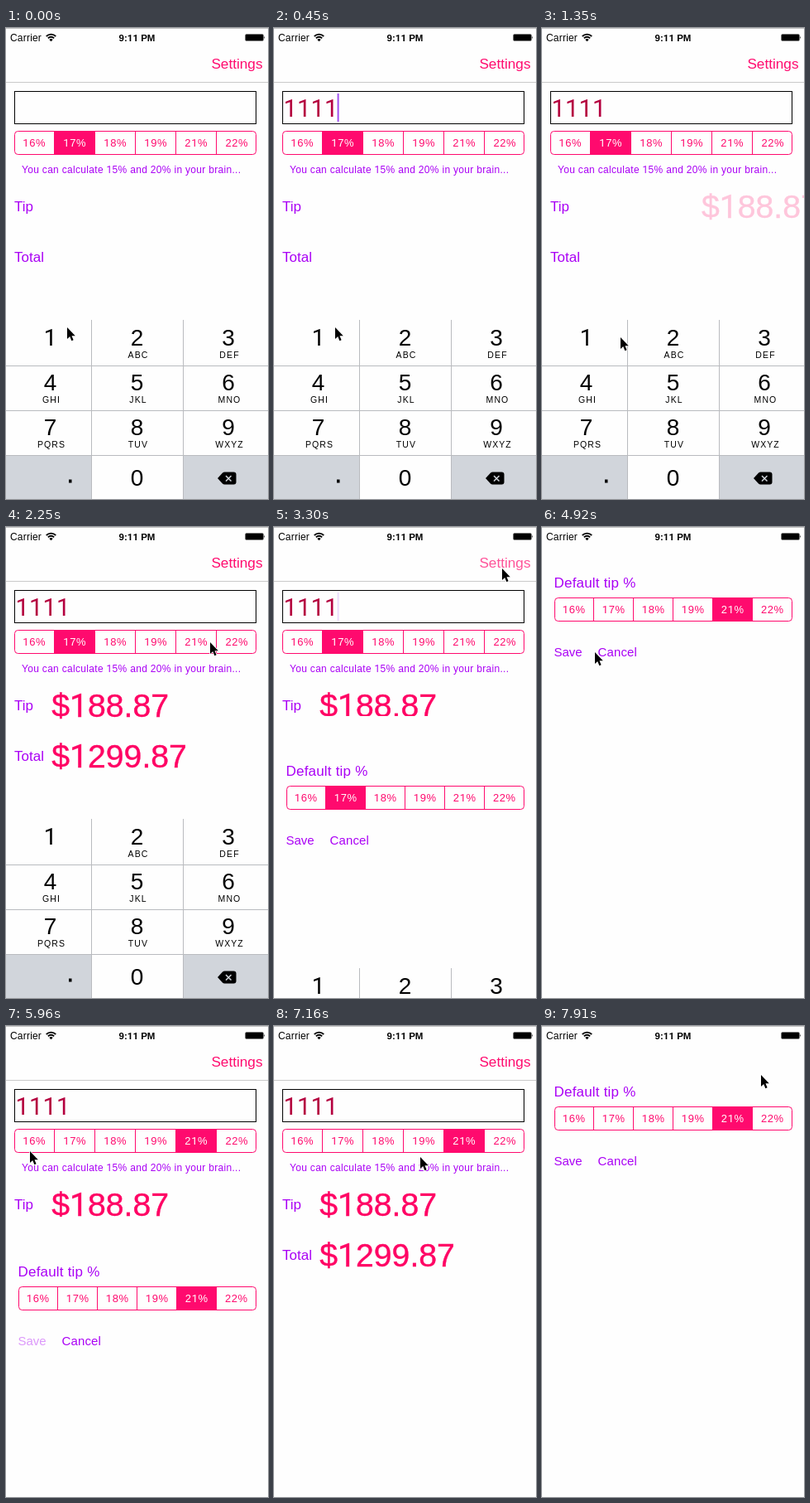
Animation, 317 px wide and 568 px high, one loop 8 s. Source, as an HTML page:

```html
<!DOCTYPE html>
<html lang="en">
<head>
<meta charset="utf-8">
<title>Tip calculator</title>
<style>
  html, body { margin: 0; width: 100%; height: 100%; overflow: hidden; background: #fefefe; }
  svg { display: block; width: 100%; height: 100%; font-family: "Liberation Sans", Arial, sans-serif; }
  text { white-space: pre; }
  .one { font-family: Roboto, sans-serif; }
  .pink { fill: #ff0a6e; }
  .purple { fill: #aa00f5; }
  .value { fill: #ff0364; stroke: #ff0364; stroke-width: .4px; font-size: 39.2px; }
  .seg { font-size: 13px; letter-spacing: .6px; text-anchor: middle; }
  .key { font-size: 28px; text-anchor: middle; }
  .letters { font-size: 10.5px; letter-spacing: 1.1px; text-anchor: middle; }
</style>
</head>
<body>
<svg id="stage" viewBox="0 0 317 568"></svg>
<script>
const BEAT = 149, LOOP = 8000, HEIGHT = 568, KEYBOARD = 216, SPRING = 2.1;
const RATES = [16, 17, 18, 19, 21, 22].map(r => r + '%');

// The plain "1" without a foot comes from a second typeface.
const plainOnes = s => s.replace(/1/g, '<tspan class="one">1</tspan>');
const text = (x, y, s, cls, attrs = '') =>
  `<text x="${x}" y="${y}" class="${cls}" ${attrs}>${plainOnes(s)}</text>`;
const rect = (x, y, w, h, attrs) =>
  `<rect x="${x}" y="${y}" width="${w}" height="${h}" ${attrs}/>`;

function segments(id, x, y, w) {
  const cell = Math.round(w / 6);
  const at = i => x - 1 + i * cell;
  return `<g id="${id}">` +
    RATES.map((_, i) => rect(at(i), y, cell, 28, 'class="pink cell"')).join('') +
    rect(x, y, w, 28, 'rx="4" fill="none" stroke="#ff0a6e"') +
    [1, 2, 3, 4, 5].map(i => `<path d="M${at(i)} ${y}v28" stroke="#ff0a6e"/>`).join('') +
    RATES.map((r, i) => text(at(i + .5) + .3, y + 18.5, r, 'seg pink')).join('') + '</g>';
}

function keyboard() {
  const letters = ['', 'ABC', 'DEF', 'GHI', 'JKL', 'MNO', 'PQRS', 'TUV', 'WXYZ'];
  const columns = [53.5, 158.5, 269];
  const keys = letters.map((s, i) => {
    const x = columns[i % 3], y = 383 + 54 * Math.floor(i / 3);
    return text(x, y, `${i + 1}`, 'key') + text(x + 1.5, y + 15, s, 'letters');
  }).join('');
  return '<g id="keyboard">' +
    rect(0, 352, 317, 216, 'fill="#fefefe"') +
    rect(0, 352, 103, 55, 'fill="#d1d5db" id="pressed"') +
    rect(0, 515, 103, 53, 'fill="#d1d5db"') + rect(215, 515, 102, 53, 'fill="#d1d5db"') +
    '<path d="M103.5 352v216M214.5 352v216M0 407.5h317M0 461.5h317M0 515.5h317" stroke="#b9bbbf"/>' +
    keys + text(158.5, 552, '0', 'key') + rect(76, 544.5, 3.5, 4, '') +
    '<path d="M256 543l6-6.5q1-1 2.5-1h11q3 0 3 3v9q0 3-3 3h-11q-1.5 0-2.5-1z"/>' +
    '<path d="M266 540l6.5 6.5m0-6.5l-6.5 6.5" stroke="#d1d5db" stroke-width="1.5"/></g>';
}

const mainScreen =
  rect(0, 0, 317, 568, 'fill="#fefefe"') +
  '<path d="M0 65.5h317" stroke="#c9c9c9"/>' +
  text(310.5, 49, 'Settings', 'pink', 'id="settings" font-size="17.2" text-anchor="end"') +
  rect(10.5, 76.5, 292, 39, 'fill="none" stroke="#000"') +
  text(11.5, 107, '', '', 'id="amount" font-size="29.4" fill="#b4003f"') +
  rect(0, 79, 2, 34, 'id="caret" fill="#a050f0"') +
  segments('rate', 10.5, 124.5, 292) +
  text(19, 175, 'You can calculate 15% and 20% in your brain...', 'purple', 'font-size="12" letter-spacing=".31"') +
  text(10, 220.5, 'Tip', 'purple', 'font-size="17"') +
  text(10, 281.5, 'Total', 'purple', 'font-size="17"') +
  text(55.2, 229, '$188.87', 'value', 'id="tip"') +
  text(55.2, 290, '$1299.87', 'value', 'id="total"');

const modal = '<g id="modal">' +
  rect(0, 1, 317, 568, 'fill="#fefefe"') +
  text(14.5, 72.5, 'Default tip %', 'purple', 'font-size="17" letter-spacing=".2"') +
  segments('preset', 15.5, 85.5, 287) +
  text(14.5, 155.5, 'Save', 'purple', 'id="save" font-size="15"') +
  text(67.5, 155.5, 'Cancel', 'purple', 'font-size="15" letter-spacing=".15"') + '</g>';

const statusBar =
  rect(0, 0, 317, 1, 'fill="#c2c2c2"') +
  text(5, 16, 'Carrier', '', 'font-size="12" letter-spacing=".2"') +
  '<g fill="none" stroke="#000" stroke-width="1.9"><path d="M48.8 10a8 8 0 0 1 11.4 0M50.9 12.3a5 5 0 0 1 7.2 0"/></g>' +
  '<path d="M52.3 14a3.2 3.2 0 0 1 4.4 0l-2.2 2.3z"/>' +
  text(158.5, 15.5, '9:11 PM', '', 'font-size="11.5" font-weight="700" text-anchor="middle"') +
  rect(289.5, 7.5, 22, 8, 'rx="1.5" fill="#000" stroke="#777" stroke-width=".6"') +
  '<path d="M312.3 9.8q1.6 1.7 0 3.4z"/>';

const pointer = '<path id="pointer" d="M0 0V14l3.2-3 2.2 5.2 2.2-1-2.1-4.9h4.3z" stroke="#fff" stroke-width="1.6" paint-order="stroke"/>';

document.getElementById('stage').innerHTML = mainScreen + modal + keyboard() + statusBar + pointer;

const el = id => document.getElementById(id);
const set = (id, name, value) => el(id).setAttribute(name, value);
const shift = (id, x, y) => set(id, 'transform', `translate(${x} ${y})`);
const clamp = v => Math.min(1, Math.max(0, v));
const within = (n, a, b) => n >= a && n <= b;
const settle = d => d <= 0 ? 0 : 1 - Math.exp(-SPRING * d);

// Pointer stops: beat, x, y
const PATH = [
  [0, 74, 361], [6, 74, 361], [9, 95, 373], [10, 110, 363], [13, 205, 236], [14, 236, 180],
  [15, 247, 139], [17, 286, 80], [20, 276, 48], [22, 276, 50], [23, 276, 52], [27, 234, 97],
  [29, 234, 97], [33, 64, 151], [34, 64, 151], [36, 30, 152], [40, 29, 151], [42, 44, 189],
  [44, 77, 265], [45, 77, 265], [51, 276, 51], [53, 265, 59]
];

function pointerAt(n) {
  const i = Math.max(1, PATH.findIndex(p => p[0] >= n));
  const [a, b] = [PATH[i - 1], PATH[i]];
  const f = (n - a[0]) / (b[0] - a[0]);
  return [1, 2].map(k => Math.round(a[k] + (b[k] - a[k]) * f));
}

function select(id, chosen) {
  el(id).querySelectorAll('.cell').forEach((c, i) => c.style.opacity = i === chosen ? 1 : 0);
  el(id).querySelectorAll('text').forEach((t, i) => t.style.fill = i === chosen ? '#fff' : '');
}

function slideIn(id, d) {
  const t = clamp(d / 3.3), p = t * t * (3 - 2 * t);
  shift(id, 176.5 * (1 - p), 0);
  set(id, 'opacity', p);
}

function modalTop(n) {
  const travel = n < 39 ? 1 - settle(n - 21.563)
    : n < 50 ? settle(n - 39.754)
    : 1 - settle(n - 51.163);
  return Math.round(HEIGHT * travel);
}

function draw(n) {
  const digits = [0, 1, 3][n] ?? 4;
  el('amount').innerHTML = plainOnes('1'.repeat(digits));
  set('caret', 'x', 11 + 16.4 * digits);
  set('caret', 'opacity', n === 22 ? .2 : within(n, 1, 6) || within(n, 10, 13) || within(n, 17, 21) ? 1 : 0);
  set('pressed', 'opacity', within(n, 1, 2) ? 1 : 0);

  slideIn('tip', n - 8);
  slideIn('total', n - 9.6);

  select('rate', n < 36 ? 1 : 4);
  select('preset', n < 29 ? 1 : 4);
  set('settings', 'opacity', { 21: .3, 22: .7, 51: .3, 52: .7 }[n] ?? 1);
  set('save', 'opacity', within(n, 38, 40) ? .4 : 1);

  shift('modal', 0, modalTop(n));
  shift('keyboard', 0, Math.round(KEYBOARD * settle(n - 21.147)));
  shift('pointer', ...pointerAt(n));
}

// The screen refreshes once per beat.
let shown = -1;
const start = performance.now();
function tick() {
  const n = Math.floor(((performance.now() - start) % LOOP) / BEAT);
  if (n !== shown) draw(shown = n);
  requestAnimationFrame(tick);
}
tick();
</script>
</body>
</html>
```
